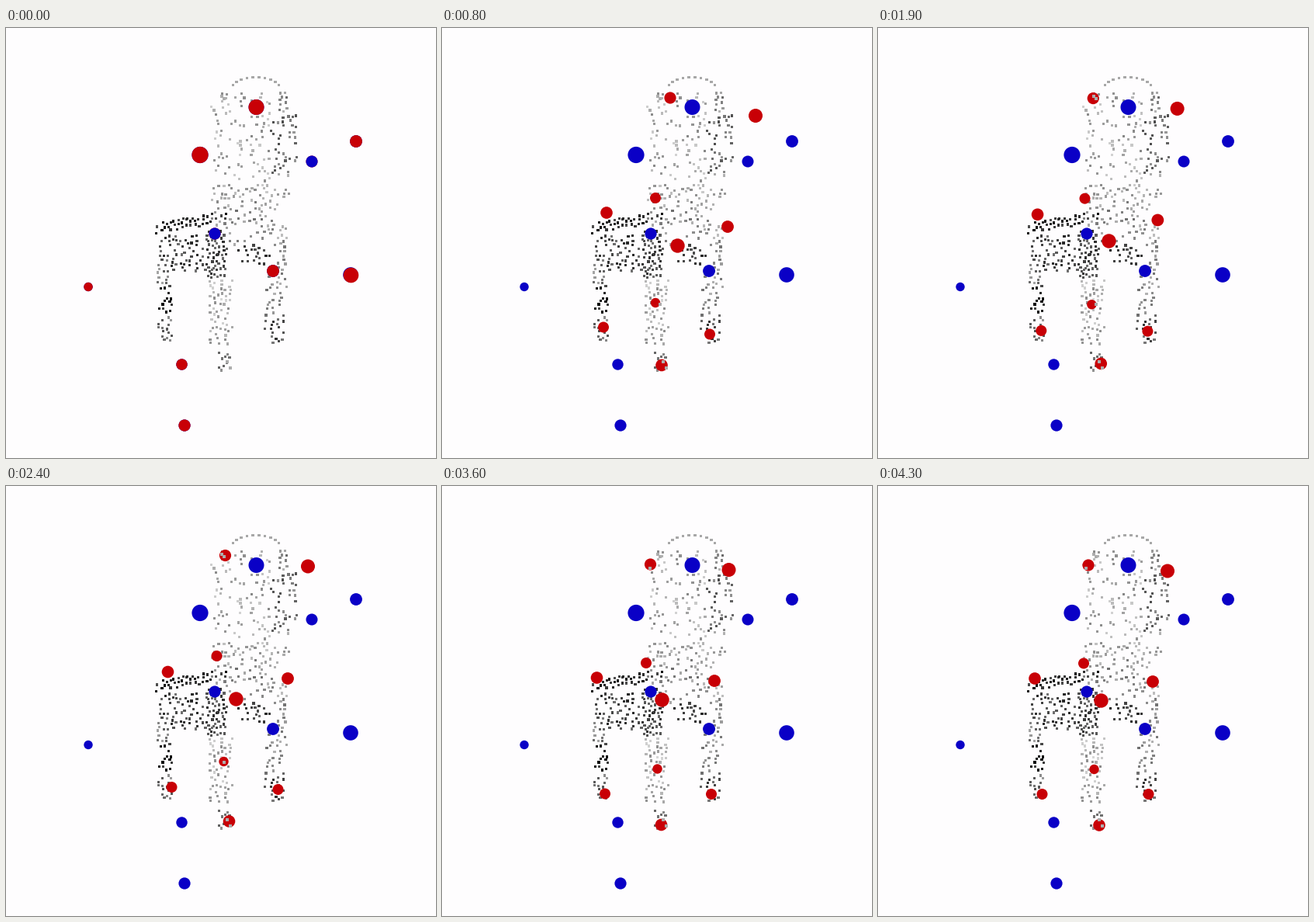
These frames come from a looping animation (554x554 px, 4400 ms). A matplotlib script:

```python
import numpy as np
import matplotlib.pyplot as plt
from matplotlib.animation import FuncAnimation

SIZE, DPI = 554, 100
FRAMES, STEP = 44, 100
BACK, RED, BLUE = "#fefdfe", "#c80006", "#0a00c6"

# Scattered starting balls: x, y, radius
START = np.array([
    (322.5, 102, 10), (451, 146, 7.9), (269, 265, 7.6), (250, 163.5, 10.6),
    (394, 172, 7.5), (444, 318, 9.8), (106, 333.5, 5.7), (226.5, 433.5, 7.2),
    (344, 313, 7.9), (230, 512, 7.6)])

# Poses of the same balls on the chair
TIMES = np.array([800, 1400, 2400, 3100, 3600, 4300])
POSES = np.array([
    [(294, 90), (404, 113), (275, 219), (212, 238), (368, 256),
     (303, 280), (275, 354), (208, 385.5), (345, 394.5), (283, 434.5)],
    [(275, 92), (385, 106), (263.5, 220.5), (204, 241), (359, 248.5),
     (298, 274.5), (271, 357), (207.5, 391), (344.5, 391), (286.5, 433)],
    [(282.5, 89.5), (389, 103.5), (271.5, 219), (208.5, 239.5), (363, 248),
     (296, 274), (280.5, 355), (213.5, 388), (350.5, 391), (287.5, 432)],
    [(273, 93.5), (378.5, 103), (266.5, 221.5), (205, 243), (358, 246),
     (293, 273), (279, 356.5), (214.5, 391), (350.5, 389.5), (289.5, 431)],
    [(268.5, 101), (369.5, 108), (263, 228), (199.5, 247), (351, 251),
     (282.5, 275), (277.5, 364.5), (210, 396.5), (347, 397), (282.5, 436.5)],
    [(271, 102), (373, 109.5), (265, 228.5), (202, 248), (354, 252),
     (286.5, 276), (278.5, 365), (211.5, 397), (348.5, 397), (285, 437)]])
RADII = np.array([7.6, 9, 7, 7.8, 7.9, 9.2, 6.2, 7, 7, 7.8])
SPEED = np.gradient(POSES, TIMES, axis=0)

# Chair cloud: x0, x1, y0, y1, count, tone
PATCHES = [
    (264, 340, 84, 222, 98, .68),
    (351, 363, 80, 108, 10, .56),
    (338, 375, 112, 188, 38, .45),
    (350, 366, 188, 218, 7, .6),
    (264, 350, 200, 280, 72, .58),
    (190, 285, 252, 266, 38, .16),
    (197, 285, 266, 314, 76, .3),
    (258, 284, 260, 322, 28, .3),
    (296, 340, 279, 307, 19, .24),
    (195, 211, 292, 330, 13, .5),
    (196, 214, 330, 370, 14, .14),
    (196, 214, 372, 403, 15, .46),
    (262, 292, 325, 407, 52, .7),
    (349, 362, 256, 335, 23, .6),
    (334, 359, 305, 368, 20, .55),
    (333, 359, 370, 406, 18, .33),
    (269, 291, 418, 443, 9, .53)]
FRONT = [(278, 88), (281, 91), (268, 106), (281, 356), (285, 430), (289, 438)]


def make_cloud():
    rng = np.random.default_rng(12)
    turn = np.linspace(.15, .85, 10) * np.pi
    dots = [(322 - 33 * np.cos(a), 82 - 19 * np.sin(a)) for a in turn]
    tones = [.66] * len(dots)
    for x0, x1, y0, y1, count, tone in PATCHES:
        for _ in range(count):
            for _ in range(30):
                x, y = rng.uniform(x0, x1), rng.uniform(y0, y1)
                if y1 == 266:  # rising rim of the seat
                    y -= .17 * (x - x0)
                gap = np.hypot(*(np.array(dots) - (x, y)).T).min()
                if gap > 4.2:
                    break
            dots.append((x, y))
            tones.append(np.clip(tone + rng.uniform(-.15, .15), .04, .85))
    return dots, tones


def balls_at(t):
    if t < TIMES[0]:
        u = t / TIMES[0]
        ease = 1 - (1 - u) ** 2
        spot = START[:, :2] + (POSES[0] - START[:, :2]) * ease
        spot[0, 1] -= 11 * np.sin(np.pi * u ** 1.5)
        return spot, START[:, 2] + (RADII - START[:, 2]) * ease
    i = min(np.searchsorted(TIMES, t, side="right") - 1, len(TIMES) - 2)
    span = TIMES[i + 1] - TIMES[i]
    u = (t - TIMES[i]) / span
    blend = u * u * (3 - 2 * u)
    spot = (POSES[i] + (POSES[i + 1] - POSES[i]) * blend
            + u * (1 - u) ** 2 * span * SPEED[i]
            - u * u * (1 - u) * span * SPEED[i + 1])
    return spot, RADII


def area(width):
    return (np.asarray(width) * 72 / DPI) ** 2


def squares(spots, tones, z):
    colors = np.repeat(np.asarray(tones)[:, None], 3, axis=1)
    ax.scatter(*np.array(spots).T, s=area(3.2), c=colors, marker="s",
               linewidths=0, zorder=z)


def discs(data, color, z):
    return ax.scatter(data[:, 0], data[:, 1], s=area(2 * data[:, 2]),
                      c=color, linewidths=0, zorder=z)


fig = plt.figure(figsize=(SIZE / DPI, SIZE / DPI), dpi=DPI, facecolor=BACK)
ax = fig.add_axes([0, 0, 1, 1])
ax.set_xlim(0, SIZE)
ax.set_ylim(SIZE, 0)
ax.axis("off")

squares(*make_cloud(), 2)
squares(FRONT, [.68] * len(FRONT), 7)

above = np.isin(np.arange(len(START)), [2, 4])
near = np.arange(len(START)) == 5
discs(START[~above], BLUE, 3)
discs(START[above], BLUE, 5)
moving = [(~near, discs(START[~near], RED, 4)),
          (near, discs(START[near], RED, 6))]


def draw(frame):
    spot, radius = balls_at(frame * STEP)
    for pick, group in moving:
        group.set_offsets(spot[pick])
        group.set_sizes(area(2 * radius[pick]))
    return [group for _, group in moving]


anim = FuncAnimation(fig, draw, frames=FRAMES, interval=STEP, repeat=True,
                     repeat_delay=0, blit=False)
plt.show()
```
